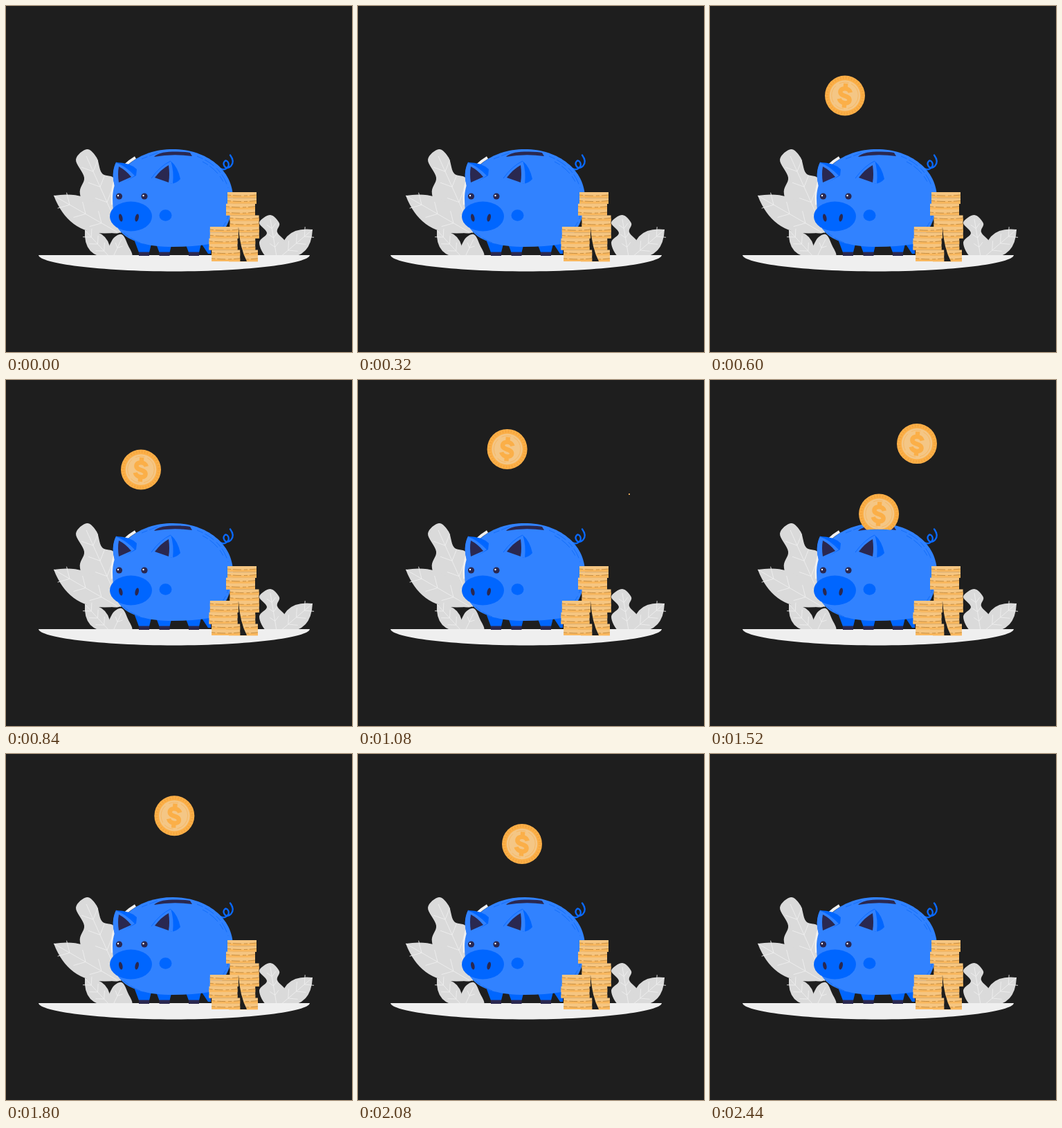
Recreate the animation shown at these times as an HTML page. Size 500x500 px, loop 2680 ms.

```html
<!DOCTYPE html>
<html lang="en">
<head>
<meta charset="utf-8">
<title>Piggy bank</title>
<style>
  html, body { margin: 0; width: 100%; height: 100%; overflow: hidden; background: #1e1e1e; }
  svg { display: block; width: 100vw; height: 100vh; }
  .leaf { fill: #dadada; }
  .vein { fill: none; stroke: #efefef; stroke-width: .9; }
  .skin { fill: #3182ff; }
  .deep { fill: #0066ff; }
  .dark { fill: #2a2850; }
  .line { fill: none; stroke: #0a69ff; }
  .hatch { fill: none; stroke: #0f69f5; stroke-width: .8; stroke-dasharray: 9 3 16 5; }
</style>
</head>
<body>
<svg viewBox="0 0 500 500">
  <defs>
    <clipPath id="opening"><path d="M0 0H500V217H266Q242 214 222 217H0Z"/></clipPath>
    <g id="coin">
      <circle r="29" fill="#fbaf48"/>
      <circle r="26" fill="none" stroke="#f3a23a" stroke-width="4" stroke-dasharray="1 3.1"/>
      <circle r="22.3" fill="#f4c685"/>
      <circle r="19.3" fill="none" stroke="#f5b661" stroke-width=".9" stroke-dasharray="26 6 14 4"/>
      <path transform="rotate(4)" fill="none" stroke="#fbaf48" stroke-width="6.4"
        d="M7.5 -5C5.5 -12 -7 -12 -7 -5S7 -1 7 6S-6 12 -8 5M0 -17.5V-9M0 9V17.5"/>
    </g>
  </defs>

  <g id="plants"></g>
  <path fill="#efefef" d="M47 360H439C438 372 350 383.5 243 383.5S48 372 47 360Z"/>
  <path d="M154 287C151 256 163 233 187 219" fill="none" stroke="#f1f1f1" stroke-width="4"/>

  <path class="line" stroke-width="2.3" stroke-linecap="round"
    d="M310 235C317 239 324 232 321 226S312 226 316 232S334 229 324 215.5"/>
  <g id="legs"></g>
  <path class="skin" d="M154 278C154 237 192 207 241 207S328 237 328 278C328 306 316 331 294 344Q271 348 241 348C205 348 172 341 160 318Q154 300 154 278Z"/>
  <path class="hatch" d="M276 217Q312 231 321 263M284 225Q304 235 314 254M170 328Q186 341 203 345M299 333Q319 319 322 298M196 221L219 212"/>
  <path class="dark" d="M214 218Q220 211 240 210.5T266 212L269 217Q241 213 214 218Z"/>
  <g id="coins" clip-path="url(#opening)"></g>

  <path class="deep" d="M159 226Q179 226 189 236L188 245L158 262Q151 242 159 226Z"/>
  <path class="skin" d="M159 226Q172 231 186 245L158 264Q151 242 159 226Z"/>
  <path class="dark" d="M163 232Q173 237 181 247L163 255Q161 243 163 232Z"/>
  <path class="deep" d="M238 224Q248 232 252 250Q247 256 238 257Z"/>
  <path class="skin" d="M238 223Q243 239 241 257L207 251Q222 231 238 223Z"/>
  <path class="dark" d="M235 230Q237 243 235 255L215 248Q224 236 235 230Z"/>
  <path class="line" d="M159 226Q173 231 188 244M210 249Q223 231 238 224"/>

  <g id="face">
    <ellipse class="deep" cx="180.5" cy="304" rx="30.5" ry="21.5"/>
    <ellipse class="deep" cx="230.5" cy="302.5" rx="9" ry="8.2"/>
  </g>
  <g id="stacks"></g>
</svg>
<script>
const LOOP = 2680;
const $ = id => document.getElementById(id);

function add(parent, tag, attrs) {
  const el = document.createElementNS('http://www.w3.org/2000/svg', tag);
  for (const name in attrs) el.setAttribute(name, attrs[name]);
  return parent.appendChild(el);
}

// Closed smooth outline through a few points.
function blob(...pts) {
  const at = i => pts[(i + pts.length) % pts.length];
  const handle = (i, sign) => at(i).map((p, k) => p + sign * (at(i + 1)[k] - at(i - 1)[k]) / 6);
  const curves = pts.map((p, i) => `C${handle(i, 1)} ${handle(i + 1, -1)} ${at(i + 1)}`);
  add($('plants'), 'path', { class: 'leaf', d: `M${pts[0]}${curves.join('')}Z` });
}

// Spine from tip to base, with pairs of ribs leaning toward the tip.
function veins(x1, y1, x2, y2, pairs, length) {
  const angle = Math.atan2(y1 - y2, x1 - x2);
  let d = `M${x1} ${y1}L${x2} ${y2}`;
  for (let i = 1; i <= pairs; i++) {
    const u = i / (pairs + 1);
    const x = x1 + (x2 - x1) * u, y = y1 + (y2 - y1) * u;
    for (const turn of [-.8, .8])
      d += `M${x} ${y}l${length * Math.cos(angle + turn)} ${length * Math.sin(angle + turn)}`;
  }
  add($('plants'), 'path', { class: 'vein', d });
}

function leaf(x1, y1, x2, y2, bulge, pairs) {
  const len = Math.hypot(x2 - x1, y2 - y1);
  const nx = (y1 - y2) / len * bulge, ny = (x2 - x1) / len * bulge;
  const mx = (x1 + x2) / 2, my = (y1 + y2) / 2;
  add($('plants'), 'path', {
    class: 'leaf',
    d: `M${x1} ${y1}Q${mx + nx} ${my + ny} ${x2} ${y2}Q${mx - nx} ${my - ny} ${x1} ${y1}Z`
  });
  veins(x1, y1, x2, y2, pairs, bulge * .42);
}

blob([117, 207], [131, 219], [139, 242], [160, 252], [182, 300], [163, 328], [125, 315], [107, 272], [113, 248], [101, 222]);
veins(116, 217, 166, 328, 4, 18);
leaf(69, 274, 161, 327, 43, 3);
blob([167, 330], [176, 345], [181, 363], [148, 363], [153, 339]);
veins(167, 337, 155, 362, 1, 8);
leaf(114, 324, 151, 364, 29, 3);
blob([382, 302], [395, 314], [392, 327], [405, 343], [401, 364], [377, 363], [366, 342], [377, 328], [366, 313]);
veins(382, 308, 391, 362, 3, 9);
leaf(443, 323, 396, 363, 33, 3);

for (const x of [199, 228.5, 271]) {
  add($('legs'), 'path', { class: 'deep', d: `M${x - 13} 340H${x + 12}L${x + 8} 356H${x - 7}Z` });
  add($('legs'), 'path', { class: 'dark', d: `M${x - 7} 355.5H${x + 8}V361H${x - 7}Z` });
}
add($('legs'), 'path', { class: 'deep', d: 'M280 340H296V358H292Z' });

for (const x of [163.5, 200]) {
  add($('face'), 'circle', { class: 'dark', cx: x, cy: 275, r: 4.6 });
  add($('face'), 'circle', { fill: '#fff', cx: x - 1.5, cy: 274, r: 1.2 });
}
for (const side of [-1, 1]) {
  add($('face'), 'ellipse', {
    class: 'dark', rx: 2.6, ry: 5.7,
    transform: `translate(${177.5 + side * 11.7} 306) rotate(${side * 12})`
  });
}

// Coins lie in pairs that are shifted a little against each other.
function stack(left, top, count, width, sway) {
  const height = 8.35;
  for (let i = 0; i < count; i++) {
    const pair = Math.floor(i / 2);
    const x = left + sway * Math.sin(3.48 + 1.23 * pair * pair), y = top + i * height;
    const band = `M${x} ${y + 4}q${width / 2} 2.4 ${width} 0`;
    const put = (d, attrs) => add($('stacks'), 'path', { d, ...attrs });
    put(`M${x} ${y}h${width}v${height}h${-width}Z`, { fill: '#f5c581' });
    put(`${band}V${y + height}h${-width}Z`, { fill: '#f9b85f' });
    put(band, { fill: 'none', stroke: '#bd8335', 'stroke-width': .8, 'stroke-dasharray': '5 3 12 4' });
  }
}

stack(321, 269, 12, 42, 3);
add($('stacks'), 'path', { fill: '#1e1e1e', d: 'M336 320Q338 350 348 369H318V320Z' });
stack(295.5, 319, 6, 41, 2);

const ramp = (t, from, span) => Math.min(1, Math.max(0, (t - from) / span));
const ease = u => u * u * (3 - 2 * u);
const curve = (a, b, c, u) => a * (1 - u) ** 2 + 2 * b * u * (1 - u) + c * u * u;

const POP = 230, REST = 110, DROP = 320;
const ABOVE = [237, 130], INSIDE = [251, 256];

// A coin pops up at `from`, arcs over `bend` to hang above the slot, then drops in.
const jumpers = [
  { born: 375, from: [195, 129.5], bend: [215, 70], hop: 910, span: 340 },
  { born: 1055, from: [392, 165], bend: [229, 14], hop: 1280, span: 690 }
];
const blinker = { born: 1125, from: [371, 88], fade: 1300, span: 150 };

function jump(c, t) {
  const u = ramp(t, c.hop, c.span);
  const fall = ease(ramp(t, c.hop + c.span + REST, DROP));
  const pos = [0, 1].map(k =>
    curve(c.from[k], c.bend[k], ABOVE[k], u) + (INSIDE[k] - ABOVE[k]) * fall);
  return [...pos, fall < 1 ? ease(ramp(t, c.born, POP)) : 0];
}

function blink(c, t) {
  return [...c.from, ease(ramp(t, c.born, POP)) * (1 - ease(ramp(t, c.fade, c.span)))];
}

const movers = [...jumpers.map(c => t => jump(c, t)), t => blink(blinker, t)];
const coins = movers.map(() => add($('coins'), 'use', { href: '#coin' }));

function draw(t) {
  movers.forEach((move, i) => {
    const [x, y, scale] = move(t);
    coins[i].setAttribute('visibility', scale > 0 ? 'visible' : 'hidden');
    coins[i].setAttribute('transform', `translate(${x} ${y}) scale(${scale})`);
  });
}

const start = performance.now();
function tick() {
  draw((performance.now() - start) % LOOP);
  requestAnimationFrame(tick);
}
tick();
</script>
</body>
</html>
```
